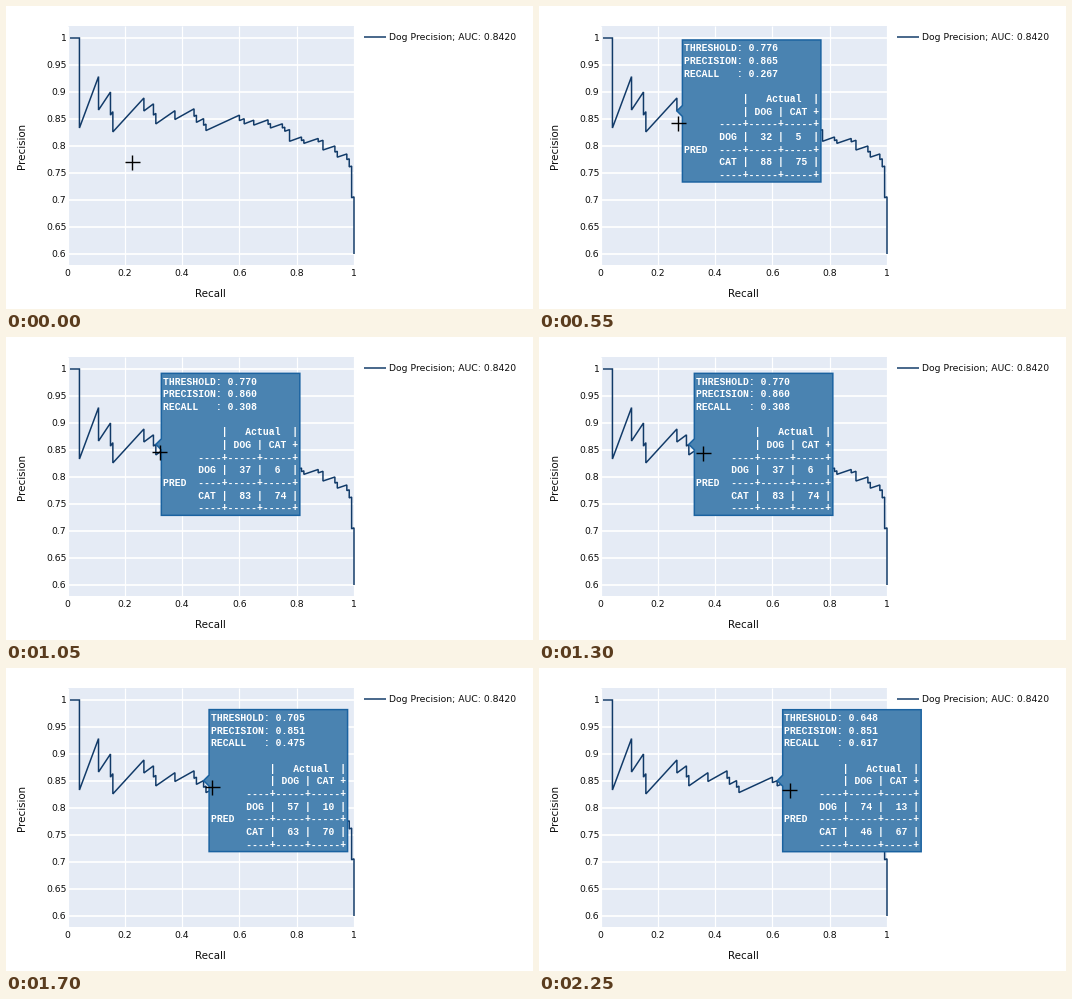
A matplotlib script for the animation above (2.3 s loop, 527 by 303 pixels).

```python
import numpy as np
import matplotlib.pyplot as plt
from matplotlib.animation import FuncAnimation

W, H, DPI = 527, 303, 64
PT = 72 / DPI  # points per pixel
FRAMES, STEP = 46, 50
DOGS, CATS = 120, 80

LEFT, RIGHT, TOP, BOTTOM = 61.5, 348, 20, 259
INK, LINE = "#0c0c0c", "#113a68"
BOX_FILL, BOX_EDGE = "#4a83b1", "#1a62a0"
BOX_W, BOX_H, ARROW = 138.5, 142, 5.5
MONO_SIZE, MONO_LEADING = 9.78, 12.68

# (true, false) positives along the curve; the false ones in between
# bunch towards the end of each stretch
KEYS = [(5, 1), (13, 2), (19, 4), (32, 5), (37, 7), (45, 8), (54, 10),
        (58, 12), (72, 13), (74, 14), (78, 15), (85, 17), (91, 19), (93, 22),
        (99, 24), (105, 25), (107, 28), (113, 32), (118, 37), (119, 50),
        (DOGS, CATS)]
BUNCHING = 0.2

# start in ms, true positives, false positives, threshold
HOVERS = [(250, 32, 5, 0.776), (1000, 37, 6, 0.770), (1350, 45, 8, 0.755),
          (1650, 57, 10, 0.705), (2100, 74, 13, 0.648)]

# ms, x, y
CURSOR_PATH = [(0, 126, 156), (350, 137, 120.5), (750, 141.7, 114),
               (1300, 164, 116.4), (1550, 203, 119), (1950, 211.4, 119),
               (2250, 250.5, 122)]


def px(recall):
    return LEFT + (RIGHT - LEFT) * recall


def py(precision):
    return 32 + 540 * (1 - precision)


def curve_point(tp, fp):
    return px(tp / DOGS), py(tp / (tp + fp))


def curve():
    tp, fp = 1, 0
    points = [curve_point(tp, fp)]
    for next_tp, next_fp in KEYS:
        count = next_fp - fp
        for i in range(count):
            share = ((i + 1) / count) ** BUNCHING
            drop = round(tp + (next_tp - tp) * share)
            points += [curve_point(drop, fp + i), curve_point(drop, fp + i + 1)]
        tp, fp = next_tp, next_fp
    return np.array(points)


def label(x, y, text, size=9.23, ha="center"):
    ax.text(x, y + 0.365 * size, text, size=size * PT, ha=ha,
            va="baseline", color=INK, family="DejaVu Sans")


def stroke(xs, ys, color, width, **style):
    style = dict(solid_capstyle="butt", solid_joinstyle="miter") | style
    return ax.plot(xs, ys, color=color, lw=width * PT, **style)[0]


fig = plt.figure(figsize=(W / DPI, H / DPI), dpi=DPI, facecolor="white")
ax = fig.add_axes([0, 0, 1, 1])
ax.set(xlim=(0, W), ylim=(H, 0))
ax.axis("off")

ax.add_patch(plt.Rectangle((LEFT, TOP), RIGHT - LEFT, BOTTOM - TOP,
                           fc="#e5ebf5", ec="none"))
for recall in np.linspace(0, 1, 6):
    x = px(recall)
    stroke([x, x], [TOP, BOTTOM], "white", 1.2)
    label(x, 267, f"{recall:g}")
for precision in np.linspace(0.6, 1, 9):
    y = py(precision)
    stroke([LEFT, RIGHT], [y, y], "white", 1.7)
    label(60.5, y, f"{precision:g}", ha="right")

label(204.5, 287.5, "Recall", 10.3)
ax.text(16.5, 139.5, "Precision", size=10.3 * PT, rotation=90, ha="center",
        va="center", color=INK, family="DejaVu Sans")
stroke([357.5, 380], [30.5, 30.5], LINE, 1.5)
label(383, 30.5, "Dog Precision; AUC: 0.8420", ha="left")
stroke(*curve().T, LINE, 1.5)

box = plt.Polygon([(0, 0), (1, 1)], fc=BOX_FILL, ec=BOX_EDGE, lw=1.5 * PT,
                  zorder=5)
ax.add_patch(box)
rows = [ax.text(0, 0, "", size=MONO_SIZE * PT, family="Liberation Mono",
                weight="bold", color="white", va="baseline", zorder=6)
        for _ in range(11)]
cross = [stroke([], [], "black", 1.4, zorder=8) for _ in range(2)]


def hover_lines(tp, fp, threshold):
    rule = "----+-----+-----+"
    return [f"THRESHOLD: {threshold:.3f}",
            f"PRECISION: {tp / (tp + fp):.3f}",
            f"RECALL   : {tp / DOGS:.3f}",
            "",
            "          |   Actual  |",
            "          | DOG | CAT +",
            "      " + rule,
            f"      DOG |  {tp:<2} |  {fp:<2} |",
            "PRED  " + rule,
            f"      CAT |  {DOGS - tp:<2} |  {CATS - fp:<2} |",
            "      " + rule]


def show_hover(tp, fp, threshold):
    x, y = curve_point(tp, fp)
    left, right = x + ARROW, x + ARROW + BOX_W
    top, bottom = y - BOX_H / 2, y + BOX_H / 2
    box.set_xy([(x, y), (left, y - ARROW), (left, top), (right, top),
                (right, bottom), (left, bottom), (left, y + ARROW)])
    for i, (row, text) in enumerate(zip(rows, hover_lines(tp, fp, threshold))):
        row.set_text(text)
        row.set_position((left + 1.8, top + 11.3 + i * MONO_LEADING))


def update(frame):
    now = frame * STEP
    started = [hover for start, *hover in HOVERS if start <= now]
    for artist in [box, *rows]:
        artist.set_visible(bool(started))
    if started:
        show_hover(*started[-1])
    times, xs, ys = zip(*CURSOR_PATH)
    x, y = np.interp(now, times, xs), np.interp(now, times, ys)
    cross[0].set_data([x - 7.5, x + 7.5], [y, y])
    cross[1].set_data([x, x], [y - 7.5, y + 7.5])
    return [box, *rows, *cross]


anim = FuncAnimation(fig, update, frames=FRAMES, interval=STEP, repeat=True,
                     repeat_delay=0)
plt.show()
```
